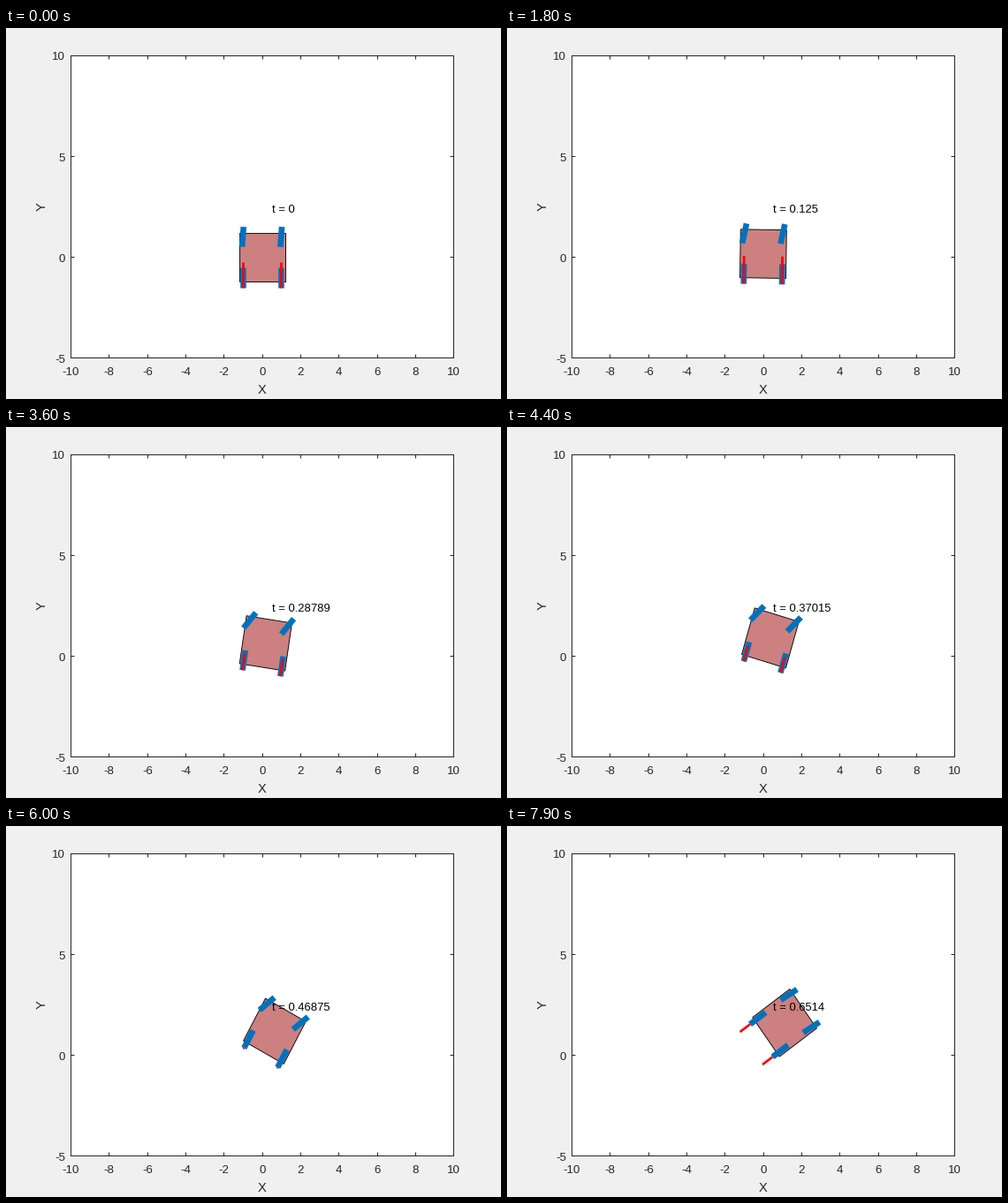
These frames come from a looping animation (560 by 420 pixels, 8000 ms). A matplotlib script:

```python
import numpy as np
import matplotlib.pyplot as plt
from matplotlib.animation import FuncAnimation
from matplotlib.patches import Polygon
from numpy.polynomial.legendre import legroots

W, H, DPI = 560, 420, 100
PX = 72 / DPI
INK = "#262626"
plt.rcParams["font.family"] = "Liberation Sans"


def smooth(s):
    s = np.clip(s, 0, 1)
    return s * s * (3 - 2 * s)


def radau(n):
    """Legendre-Gauss-Radau nodes mapped to 0..1."""
    nodes = np.sort(legroots([0] * (n - 1) + [1, 1]).real)
    return (nodes + 1) / 2


def mesh_times():
    """Solver times: intervals of 1/32 s, denser at the start and at braking."""
    ends = np.interp(range(22), [0, 4, 11, 12, 15, 21], [0, 18, 42, 45, 60, 80])
    counts = np.diff(np.round(ends).astype(int))
    t = np.concatenate([(i + radau(n)) / 32 for i, n in enumerate(counts)])
    return np.abs(np.round(t, 9))


def centre_at(t):
    return t**2 * np.array([-0.5 + 14.2 * t - 14.34 * t**2,
                            12.3 - 19.0 * t + 9.04 * t**2])


def heading_at(t, rate=140, ramp=0.53):
    """Degrees clockwise from +Y; the turn rate eases in, then holds."""
    s = min(t / ramp, 1)
    return rate * (ramp * (s**3 - s**4 / 2) + max(t - ramp, 0))


def steer_at(t):
    if t < 7 / 32:
        kick = 45 * t / 0.016 * np.exp(1 - t / 0.016)
        return 4.8 + 56 * min(t, 0.125) + kick + 30 * smooth((t - 0.125) / 0.06)
    return 33 - 142 * (t - 0.2) ** 2


def force_at(t):
    return np.interp(t, [0, 0.125, 0.219, 0.37, 0.44, 0.57, 0.6],
                     [1.27, 1.38, 0.9, 0.8, -0.05, -0.06, -0.65])


times = mesh_times()

fig = plt.figure(figsize=(W / DPI, H / DPI), dpi=DPI, facecolor="#f0f0f0")
L, R, T, B = 72.9, 506.2, 31.0, 373.4
ax = fig.add_axes([L / W, 1 - B / H, (R - L) / W, (B - T) / H])
ax.set(xlim=(-10, 10), ylim=(-5, 10))
ax.set_xticks(range(-10, 11, 2))
ax.set_yticks(range(-5, 11, 5))
ax.tick_params(direction="in", top=True, right=True, length=4.4 * PX,
               width=PX, color=INK, labelbottom=False, labelleft=False)
for spine in ax.spines.values():
    spine.set(linewidth=PX, color=INK)


def label(x, y, s, size=13.2, color=INK, ha="center", **kw):
    return fig.text(x / W, 1 - y / H, s, fontsize=size * PX, color=color,
                    ha=ha, va=kw.pop("va", "baseline"), **kw)


for v in range(-10, 11, 2):
    label(L + (v + 10) * (R - L) / 20 + 0.5, 393, str(v))
for v in range(-5, 11, 5):
    label(67.2, B - (v + 5) * (B - T) / 15 + 5.5, str(v), ha="right")
label(290, 414, "X", 14.67)
label(41, 202.5, "Y", 14.67, rotation=90, va="center")
clock = label(301, 209, "", size=13, color="black", ha="left")

SQUARE = np.array([(-1, -1), (-1, 1), (1, 1), (1, -1)])
body = ax.add_patch(Polygon(SQUARE * 1.2, facecolor=(0.8, 0.5, 0.5),
                            edgecolor="black", linewidth=0.9 * PX, zorder=2))


def bar(color, width, z):
    return ax.plot([], [], color=color, lw=width * PX, zorder=z,
                   solid_capstyle="butt")[0]


wheels = [bar("#0072BD", 6.67, 3) for _ in SQUARE]
arrows = [bar("red", 2.67, 4) for _ in range(2)]


def forward(deg):
    a = np.radians(deg)
    return np.array([np.sin(a), np.cos(a)])


def draw(i):
    t = times[i]
    centre, head = centre_at(t), heading_at(t)
    ahead, side = forward(head), forward(head + 90)

    def place(pts):
        return centre + pts[:, :1] * side + pts[:, 1:] * ahead

    body.set_xy(place(SQUARE * 1.2))
    steer = forward(head + steer_at(t))
    hubs = place(SQUARE)
    for wheel, hub, (_, end) in zip(wheels, hubs, SQUARE):
        half = 0.5 * (steer if end > 0 else ahead)
        wheel.set_data(*np.transpose([hub - half, hub + half]))
    force = force_at(t) * ahead
    for arrow, hub in zip(arrows, (hubs[0], hubs[3])):
        tail = hub - 0.5 * ahead
        arrow.set_data(*np.transpose([tail, tail + force]))
    clock.set_text(f"t = {t:.5g}")
    return [body, clock, *wheels, *arrows]


anim = FuncAnimation(fig, draw, frames=len(times), interval=100,
                     repeat=True, repeat_delay=0)
plt.show()
```
